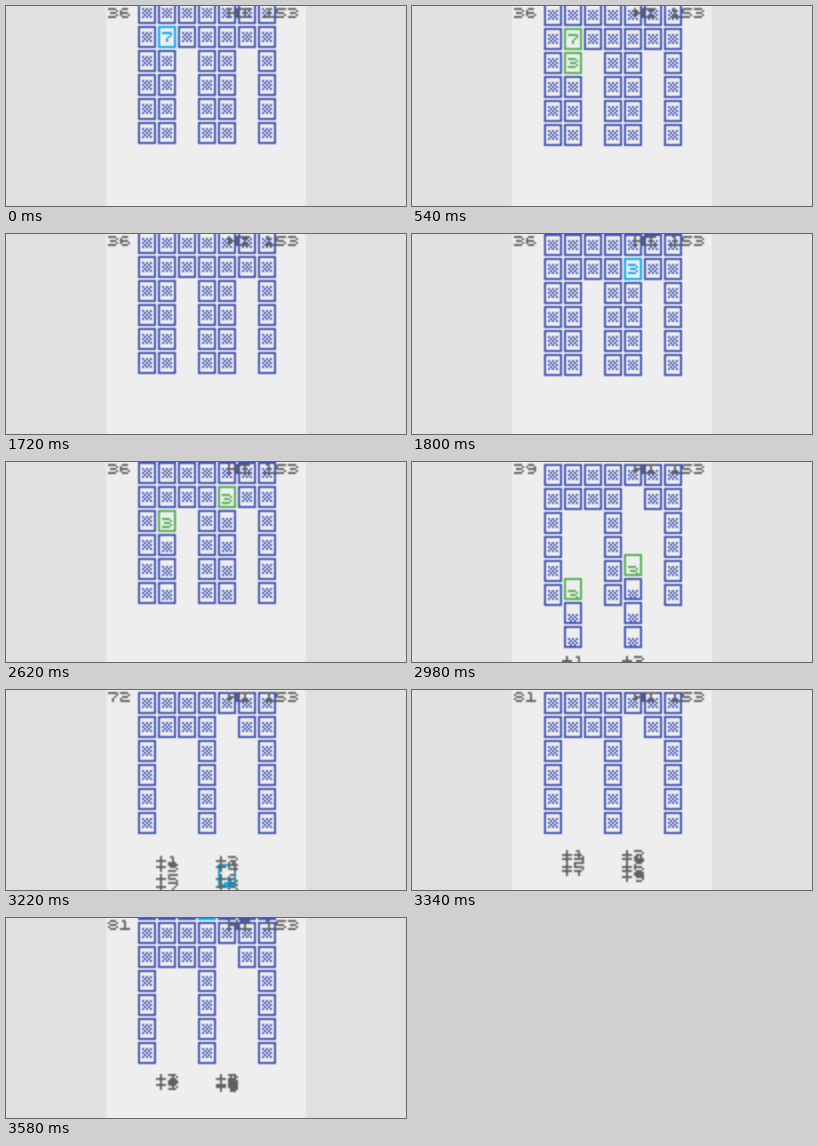
Animation, 400 px wide and 200 px high, one loop 3600 ms. Source, as an HTML page with a canvas:

```html
<!DOCTYPE html>
<html lang="en">
<meta charset="utf-8">
<title>Falling cards</title>
<style>
  html, body { margin: 0; width: 100%; height: 100%; overflow: hidden; background: #e0e0e0; }
  canvas { display: block; width: 400px; height: 200px; }
</style>
<canvas width="200" height="100"></canvas>
<script>
const ctx = document.querySelector('canvas').getContext('2d');
const BLUE = '#3f51b5', GREEN = '#4caf50', CYAN = '#03a9f4', INK = '#616161', PAPER = '#eee';
const LOOP = 3600, STEP = 20, FALL_AT = 2620, LEFT = 50;

// Pen strokes on a 5 x 5 grid; "." is a single dot.
const strokes = {
  1: 'M1 0h1v4M0 4h4',
  2: 'M0 0h3M4 1.M1 2h2M0 3v1h4',
  3: 'M0 0h3M4 1.M1 2h2M4 3.M0 4h3',
  4: 'M2 0h1v4M1 1.M0 2v1h4',
  5: 'M4 0h-4v2h3M4 3.M0 4h3',
  6: 'M1 0h2M0 1v2M0 2h3M4 3.M1 4h2',
  7: 'M0 0h4v1M3 2.M2 3v1',
  8: 'M1 0h2M0 1.M4 1.M1 2h2M0 3.M4 3.M1 4h2',
  9: 'M1 0h2M0 1.M4 1v2M1 2h3M1 4h2',
  '+': 'M2 0v4M0 2h4',
  H: 'M0 0v4M4 0v4M0 2h4',
  I: 'M0 0h4M2 0v4M0 4h4',
  ' ': ''
};
const glyphs = {};
for (const k in strokes) glyphs[k] = new Path2D(strokes[k].replace(/\./g, 'h.01'));
glyphs['#'] = new Path2D();
for (let i = 0; i < 25; i += 2) glyphs['#'].rect(i % 5 - .5, Math.floor(i / 5) - .5, 1, 1);

function glyph(ch, x, y, color) {
  ctx.save();
  ctx.translate(x + .5, y + .5);
  if (ch === '#') {
    ctx.fillStyle = color;
    ctx.fill(glyphs[ch]);
  } else {
    ctx.strokeStyle = color;
    ctx.stroke(glyphs[ch]);
  }
  ctx.restore();
}

function text(str, x, y) {
  [...String(str)].forEach((ch, i) => glyph(ch, x + 6 * i + 1, y + 1, INK));
}

// Distance fallen after n steps: speed starts at 1 and grows by 0.1.
const fall = n => n + .05 * n * (n - 1);
const speed = n => 1 + .1 * n;

// The board creeps down one unit at a time.
const drift = t => -14 + [360, 1780, 2860, 3560].filter(s => t >= s).length;

const exitY = (r, n) => 12 * r - 5.5 + Math.round(fall(n));
function exitStep(r) {
  let n = 0;
  while (exitY(r, n) <= 99) n++;
  return n;
}

const falls = (c, r) => c === 1 && r >= 3 || c === 4 && r >= 2;
const drops = [];
for (let r = 6; r >= 2; r--)
  for (const c of [1, 4])
    if (falls(c, r)) drops.push({ c, n: exitStep(r), y: exitY(r, exitStep(r)) });

// Open cards as [digit, colour], keyed by column and row.
function openCards(t) {
  if (t < 540) return { '1,2': [7, CYAN] };
  if (t < 1720) return { '1,2': [7, GREEN], '1,3': [3, GREEN] };
  if (t < 1800) return {};
  if (t < FALL_AT) return { '4,2': [3, CYAN] };
  const color = (t - FALL_AT) / STEP < exitStep(3) ? GREEN : CYAN;
  const open = { '1,3': [3, color], '4,2': [3, color] };
  if (t >= 3560) open['3,0'] = [5, CYAN];
  return open;
}

function draw(t) {
  const n = (t - FALL_AT) / STEP, open = openCards(t);
  ctx.clearRect(0, 0, 200, 100);
  ctx.fillStyle = '#e0e0e0';
  ctx.fillRect(0, 0, 200, 100);
  ctx.fillStyle = PAPER;
  ctx.fillRect(LEFT, 0, 100, 100);
  ctx.lineWidth = 1;
  ctx.lineCap = 'square';

  for (let r = 0; r < 7; r++)
    for (let c = 0; c < 7; c++) {
      if (r > 2 && (c === 2 || c === 5)) continue;
      const falling = n >= 0 && falls(c, r);
      if (falling && n >= exitStep(r)) continue;
      const [face, color] = open[c + ',' + r] || ['#', BLUE];
      const x = LEFT + 16 + 10 * c;
      const boxY = drift(t) + 12 * r + (falling ? Math.round(fall(n)) : 0);
      const faceY = drift(t - STEP) + 12 * r + (falling ? Math.round(fall(n) + speed(n)) : 0);
      ctx.strokeStyle = color;
      ctx.strokeRect(x + .5, boxY + .5, 8, 10);
      glyph(face, x + 2, faceY + 3, color);
    }

  let score = 36;
  drops.forEach((d, i) => {
    const age = n - d.n;
    if (age < 0) return;
    score += i + 1;
    const rise = 20 * (1 - .9 ** age);
    if (age <= 30) text('+' + (i + 1), LEFT + 14 + 10 * d.c, Math.floor(d.y - rise - 3));
  });
  text(score, LEFT, 0);
  text('HI 153', LEFT + 60, 0);
}

function frame() {
  draw(Math.floor(performance.now() % LOOP / STEP) * STEP);
  requestAnimationFrame(frame);
}
frame();
</script>
</html>
```
